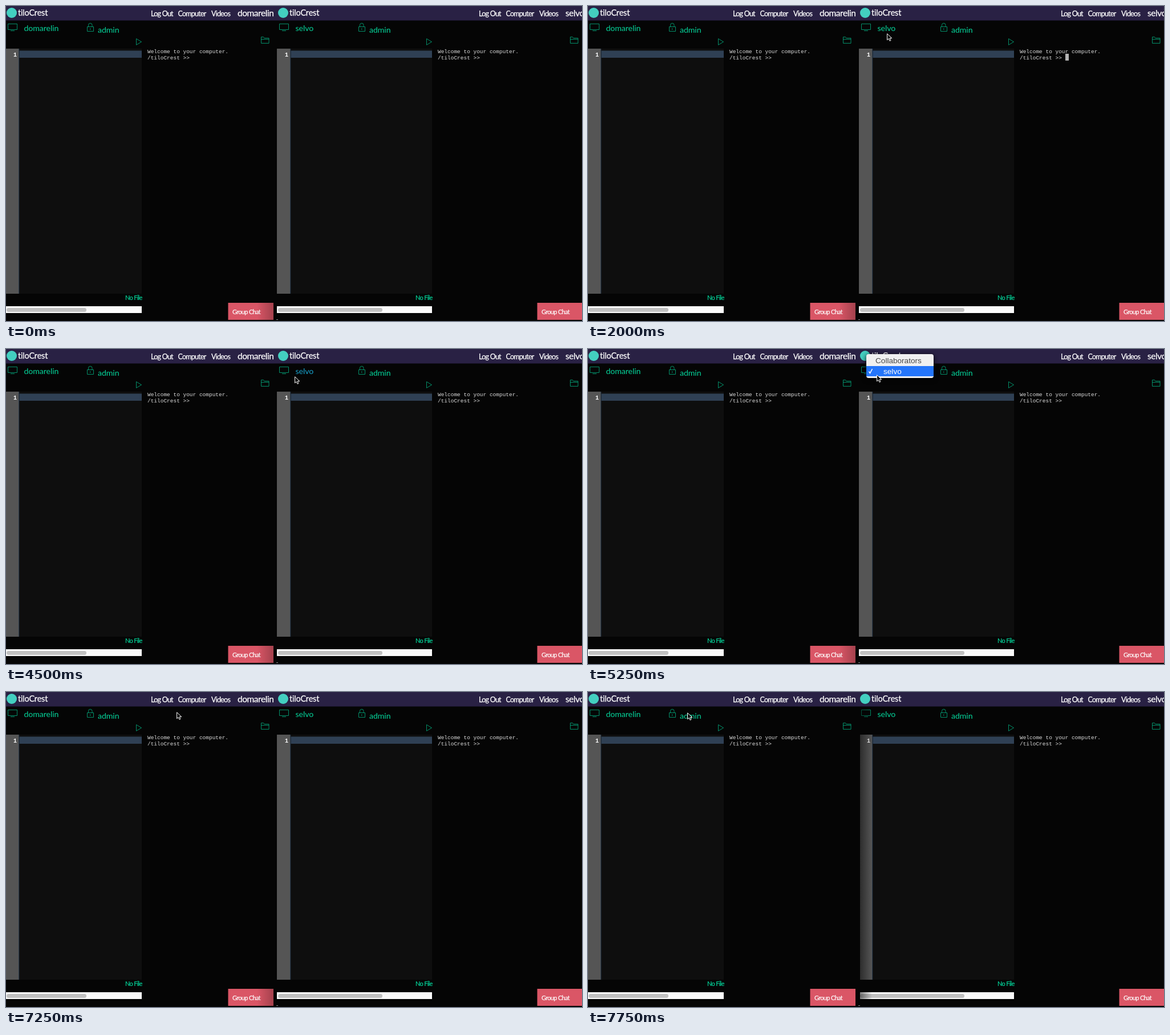
Recreate the animation shown at these times as an HTML page. Size 1010 by 554 pixels, loop 8000 ms.

```html
<!DOCTYPE html>
<html lang="en">
<head>
<meta charset="utf-8">
<title>Shared shell</title>
<style>
html, body { margin: 0; width: 100%; height: 100%; overflow: hidden; background: #050505; }
svg { display: block; width: 1010px; height: 554px; }
text { font-family: Lato, sans-serif; white-space: pre; }
.nav, .brand, .user { fill: #fff; stroke: #fff; stroke-width: .25; }
.nav { font-size: 12.5px; letter-spacing: -.75px; }
.brand { font-size: 14.5px; letter-spacing: -.2px; }
.user { font-size: 15.5px; letter-spacing: -.45px; }
.label { font-size: 14.2px; letter-spacing: -.1px; fill: #05d59b; }
.small { font-size: 11px; letter-spacing: -.7px; stroke-width: .2; }
.term { font: 9.47px "Liberation Mono", monospace; fill: #dcdcdc; }
.line { font: bold 10px "Liberation Mono", monospace; fill: #fff; }
.menu { font: 13.6px "Liberation Sans", sans-serif; }
.icon { fill: none; stroke: #04a87c; stroke-width: .85; }
</style>
</head>
<body>
<svg viewBox="0 0 1010 554">
  <defs>
    <linearGradient id="seamFade">
      <stop offset=".087" stop-color="#050505"/>
      <stop offset=".087" stop-color="#050505" stop-opacity=".5"/>
      <stop offset="1" stop-color="#050505" stop-opacity="0"/>
    </linearGradient>
    <linearGradient id="chatFade">
      <stop offset="0" stop-color="#050505" stop-opacity="0"/>
      <stop offset="1" stop-color="#050505" stop-opacity=".25"/>
    </linearGradient>
  </defs>
  <g id="scene"></g>
  <rect id="shade" x="440" y="522" width="29" height="30" fill="url(#chatFade)"/>
  <rect id="seam" x="475" y="26" width="23" height="525" fill="url(#seamFade)"/>
  <g id="owner"></g>
  <rect id="block" x="837" y="84" width="6" height="12" fill="#b4b4b4"/>
  <g id="menu" style="filter: drop-shadow(0 2px 4px #000)">
    <rect x="488" y="9" width="118" height="42" rx="4" fill="#f0f0f0"/>
    <rect x="488" y="30" width="118" height="18" fill="#2475fa"/>
    <text class="menu" x="504" y="25" fill="#484848">Collaborators</text>
    <text class="menu" x="518" y="44" fill="#fff">selvo</text>
    <path d="M492.5 39.5l2 3 4-7.5" fill="none" stroke="#fff" stroke-width="1.5"/>
  </g>
  <path id="pointer" d="M.6.8v11l2.6-2.4 1.8 4 1.9-.8-1.8-3.9h3.7z"
    fill="#000" stroke="#fff" stroke-width="1" stroke-linejoin="round"/>
</svg>
<script>
const $ = id => document.getElementById(id);
const rect = (x, y, w, h, fill, rx = 0) =>
  `<rect x="${x}" y="${y}" width="${w}" height="${h}" rx="${rx}" fill="${fill}"/>`;
const text = (cls, x, y, str, attrs = '') =>
  `<text class="${cls}" x="${x}" y="${y}" ${attrs}>${str}</text>`;
const icon = (x, y, d) => `<path class="icon" transform="translate(${x} ${y})" d="${d}"/>`;

// left: editor, icons and labels; mid: terminal column; chat: right-hand corner
function pane({ left, width, thumb, mid, nav, chat, user }) {
  return `<circle cx="${left + 10}" cy="12" r="9" fill="#43cfc0"/>`
    + text('brand', left + 21, 17, 'tiloCrest')
    + text('nav', nav, 17.5, 'Log Out')
    + text('nav', nav + 47.5, 17.5, 'Computer')
    + text('nav', nav + 106, 17.5, 'Videos')
    + text('user', nav + 152, 18, user)
    + icon(left + 3, 31, 'M.5.5h16v10h-16zM5 12.5h7')
    + icon(left + 142, 30, 'M.5 6.5h11v8h-11zM2.5 6.5v-3a3.2 3.2 0 0 1 6.5 0v3M5.8 9v3')
    + text('label', left + 161, 46.5, 'admin')
    + icon(mid + 228, 57, 'M.5.5l9 5.5-9 5.5z')
    + icon(chat + 447, 54, 'M.5 11.5v-11h4l1.5 2h8v9zM.5 4.5h13.5')
    + rect(left - 1, 75, 23, 431, '#555')
    + rect(left + 22, 75, 1.5, 431, '#2c3b4a')
    + rect(left + 23.5, 75, width - 23.5, 431, '#0e0e0e')
    + rect(left + 23.5, 78.5, width - 23.5, 12.5, '#2f4054')
    + text('line', left + 13, 88.5, '1')
    + text('term', mid + 248, 82.5, 'Welcome to your computer.')
    + text('term', mid + 248, 93.5, '/tiloCrest &gt;&gt;')
    + text('small', mid + 209, 517, 'No File', 'fill="#05d59b" stroke="#05d59b"')
    + rect(left - 1, 528, width + 1, 12, '#fafafa')
    + rect(left + 1, 531, thumb, 7, '#c1c1c1', 3.5)
    + rect(chat + 389.5, 522, 79.5, 30, '#da5666')
    + text('small', chat + 397, 541.5, 'Group Chat', 'fill="#fff" stroke="#fff"');
}

$('scene').innerHTML = rect(0, 0, 1010, 554, '#050505')
  + rect(0, 0, 1010, 25.5, '#292144')
  + pane({ left: 0, width: 238, thumb: 140, mid: 0, nav: 254, chat: 0, user: 'domarelin' })
  + pane({ left: 476, width: 271, thumb: 183, mid: 509, nav: 829, chat: 542, user: 'selvo' })
  + text('label', 31.5, 43.5, 'domarelin')
  + rect(474, 551, 3, 1, '#888');
$('owner').innerHTML = text('label', 507.5, 43.5, 'selvo', 'style="fill: inherit"');

const LOOP = 8000;
const GREEN = '#05d59b', FADING = '#18a2cd', BLUE = '#2488ec';
// [start time, value...]; each value holds until the next one
const pointerAt = [
  [0, -50, 0], [500, 702, 125], [750, 696, 210], [1250, 685, 206], [1500, 532, 51],
  [1750, 524, 48], [2250, 500, 57], [2500, 409, 103], [4500, 506, 48], [4750, 506, 45],
  [7000, 307, 37], [7250, 299, 35], [7750, 174, 36]
];
const ownerColor = [
  [0, GREEN], [2250, FADING], [2500, GREEN], [4500, FADING],
  [4750, BLUE], [7000, FADING], [7250, GREEN]
];
const menuOpacity = [[0, 0], [5250, 1], [6500, .72], [6750, 0]];
const held = (steps, t) => steps.findLast(s => s[0] <= t).slice(1);
const show = (id, on) => $(id).setAttribute('visibility', on ? 'visible' : 'hidden');

function draw(t) {
  $('pointer').setAttribute('transform', `translate(${held(pointerAt, t)})`);
  $('owner').setAttribute('fill', held(ownerColor, t)[0]);
  $('menu').setAttribute('opacity', held(menuOpacity, t)[0]);
  show('block', t >= 2000 && t < 5250 && t % 1000 < 500);
  show('shade', t < 7500);
  show('seam', t >= 7500);
}

const start = performance.now();
function tick() {
  draw((performance.now() - start) % LOOP);
  requestAnimationFrame(tick);
}
tick();
</script>
</body>
</html>
```
